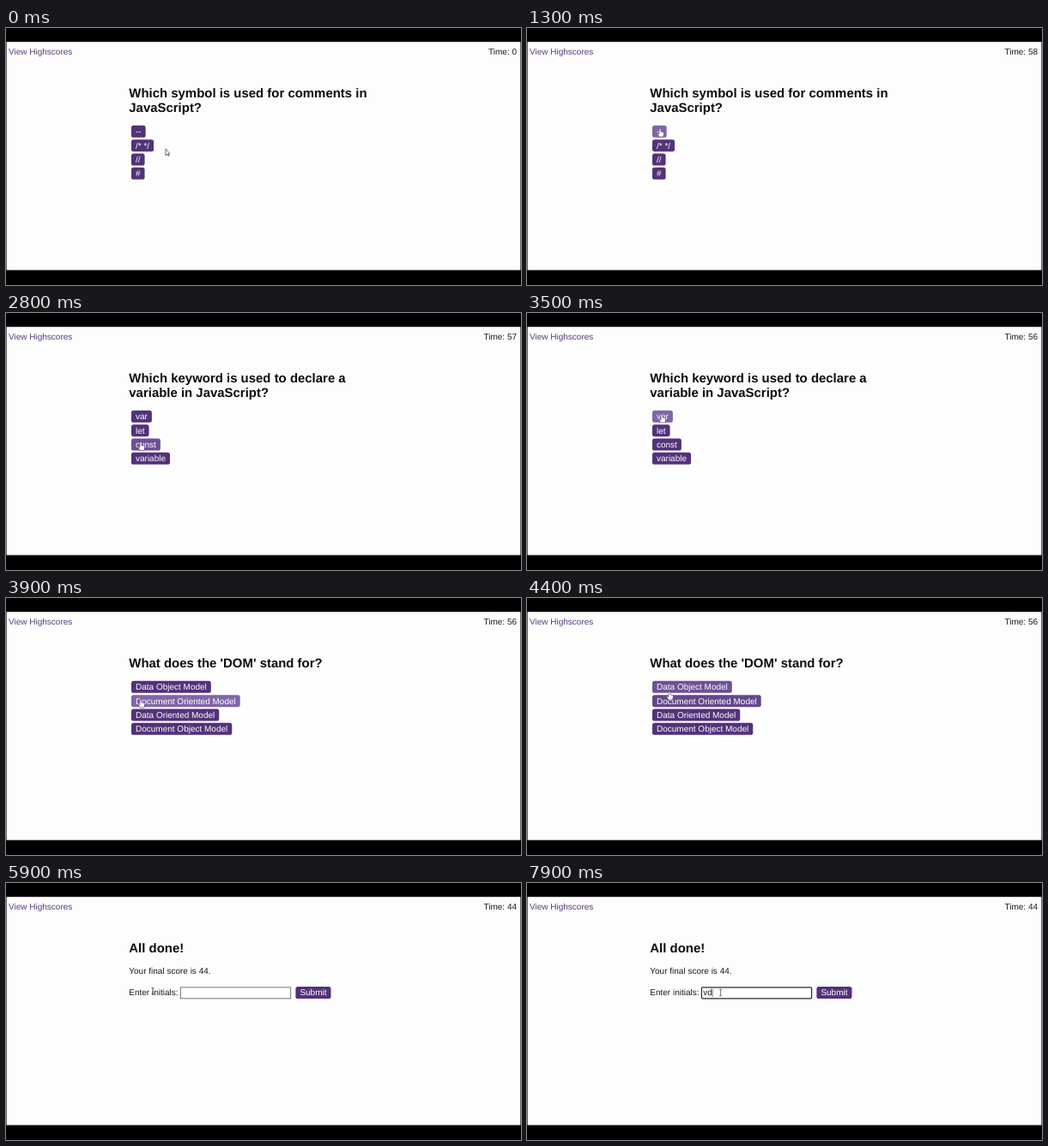
An HTML page for the animation above (8000 ms loop, 600 by 300 pixels).

```html
<!DOCTYPE html>
<html lang="en">
<head>
<meta charset="utf-8">
<title>Code quiz</title>
<style>
  html, body { margin: 0; width: 100%; height: 100%; overflow: hidden; background: #000; }
  svg { display: block; width: 600px; height: 300px; }
  text { font: 10px "Liberation Sans", Arial, sans-serif; fill: #1c1b1e; text-rendering: geometricPrecision; white-space: pre; }
  .title { font-size: 14.94px; font-weight: bold; fill: #0c0b0e; }
  .link { fill: #563d7c; }
  .label { fill: #fff; }
  .end { text-anchor: end; }
</style>
</head>
<body>
<svg viewBox="0 0 600 300">
  <rect width="600" height="300"/>
  <rect x=".6" y="16.2" width="598.8" height="266.4" fill="#fefdfd"/>
  <text class="link" x="3" y="30.6">View Highscores</text>
  <text class="end" id="clock" x="595" y="30.6"></text>
  <g id="page"></g>
  <g id="pointer"></g>
</svg>
<script>
const LOOP = 8000, STEP = 100;
const LEFT = 143.3, ROW = 16.35, LINE = 17;
const BASE = [82, 50, 121], HOVER = [128, 102, 168];

const screens = [
  { from: 0, title: ['Which symbol is used for comments in', 'JavaScript?'],
    options: ['--', '/* */', '//', '#'] },
  { from: 2800, title: ['Which keyword is used to declare a', 'variable in JavaScript?'],
    options: ['var', 'let', 'const', 'variable'] },
  { from: 3800, title: ["What does the 'DOM' stand for?"],
    options: ['Data Object Model', 'Document Oriented Model', 'Data Oriented Model', 'Document Object Model'] },
  { from: 4600, title: ['How do you call a function in JavaScript?'],
    options: ['call myFunction', 'myFunction()', 'run myFunction()', 'call function myFunc()'] },
  { from: 5800, title: ['All done!'], form: true }
];
const WRONG = 4600, DONE = 5800, FOCUS = 6800, TYPE = 7800;

const start = { x: 186, y: 141 };
const moves = [
  { from: 0, to: 600, x: 155, y: 117 },
  { from: 1600, to: 2500, x: 157, y: 150.5 },
  { from: 2800, to: 3100, x: 160, y: 164 },
  { from: 3200, to: 3500, x: 157, y: 118 },
  { from: 3900, to: 4000, x: 164, y: 124 },
  { from: 4200, to: 4500, x: 166, y: 107 },
  { from: 4700, to: 5500, x: 166, y: 150 },
  { from: 5800, to: 5900, x: 171, y: 126 },
  { from: 6300, to: 6900, x: 225.5, y: 128 }
];

const pointers = {
  arrow: '<path d="M0 0V8L2 6 3 8.5 4 8 3 6H5Z" fill="#fff" stroke="#333" stroke-width=".7"/>',
  hand: '<path d="M-1 1Q0-1 1 1V4L4 4.5Q5 5 4.5 6L4 10H-1L-3 6.5V5.5L-1 6.5Z" fill="#fff" stroke="#4a3a66" stroke-width=".6"/>',
  beam: '<path d="M-1.6-3.8H1.6M0-3.8V3.8M-1.6 3.8H1.6" stroke="#444" stroke-width=".7"/>'
};

const byId = id => document.getElementById(id);
const pen = document.createElement('canvas').getContext('2d');
pen.font = '100px "Liberation Sans", Arial, sans-serif';
const textWidth = s => pen.measureText(s).width / 10;

const screenAt = t => screens.filter(s => s.from <= t).pop();
const typedAt = t => 'vd'.slice(0, Math.max(0, (t - TYPE) / STEP + 1));

function timeLeft(t) {
  if (t < 200) return 0;
  const ticks = Math.floor((Math.min(t, DONE) - 200) / 1060);
  return 59 - ticks - (t >= WRONG ? 10 : 0);
}

const easeOut = k => 1 - (1 - k) ** 2;

function pointAt(t) {
  let { x, y } = start;
  for (const m of moves) {
    const k = easeOut(Math.min(1, Math.max(0, (t - m.from) / (m.to - m.from))));
    x += (m.x - x) * k;
    y += (m.y - y) * k;
  }
  return { x, y };
}

for (const s of screens) {
  const top = 96.8 + (s.title.length - 1) * LINE;
  s.buttons = s.form
    ? [{ x: 337.4, y: 121, label: 'Submit' }]
    : s.options.map((label, i) => ({ x: 146, y: top + i * ROW, label }));
  for (const b of s.buttons) b.w = textWidth(b.label) + 10;
}

function buttonAt(t) {
  const { x, y } = pointAt(t);
  return screenAt(Math.max(0, t)).buttons
    .find(b => x >= b.x && x <= b.x + b.w && y >= b.y && y <= b.y + 14);
}

const text = (x, y, s, cls = '') => `<text x="${x}" y="${y}" class="${cls}">${s}</text>`;

function button(b, glow) {
  const fill = BASE.map((c, i) => Math.round(c + (HOVER[i] - c) * glow));
  return `<rect x="${b.x}" y="${b.y}" width="${b.w}" height="14" rx="2.6" fill="rgb(${fill})"/>` +
    text(b.x + 5, b.y + 10.4, b.label, 'label');
}

function form(t) {
  const on = t >= FOCUS, word = typedAt(t), x = 205.2;
  const caret = `<rect x="${x + textWidth(word)}" y="123.6" width=".6" height="9.6" fill="#222"/>`;
  return text(LEFT, 106.3, 'Your final score is 44.') +
    text(LEFT, 131.2, 'Enter initials:') +
    `<rect x="203.4" y="121.8" width="128.2" height="13" rx="${on ? 1 : 0}" fill="#fff" ` +
    `stroke="${on ? '#2c2a30' : '#77747a'}" stroke-width="${on ? 1.2 : 1}"/>` +
    text(x, 131.2, word) + (on ? caret : '');
}

function draw(t) {
  const s = screenAt(t), { x, y } = pointAt(t);
  const hot = buttonAt(t), before = buttonAt(t - STEP);
  // the hover colour fades in and out over two steps
  const glow = b => (b === hot ? 0.6 : 0) + (b === before ? 0.4 : 0);
  byId('clock').textContent = 'Time: ' + timeLeft(t);
  byId('page').innerHTML =
    s.title.map((line, i) => text(LEFT, 81.3 + i * LINE, line, 'title')).join('') +
    (s.form ? form(t) : '') +
    s.buttons.map(b => button(b, glow(b))).join('');
  const kind = hot ? 'hand' : s.form && y < 136 ? 'beam' : 'arrow';
  byId('pointer').innerHTML = `<g transform="translate(${x} ${y})">${pointers[kind]}</g>`;
}

let last = -1;
function tick() {
  const t = Math.floor((performance.now() % LOOP) / STEP) * STEP;
  if (t !== last) draw(last = t);
  requestAnimationFrame(tick);
}
tick();
</script>
</body>
</html>
```
